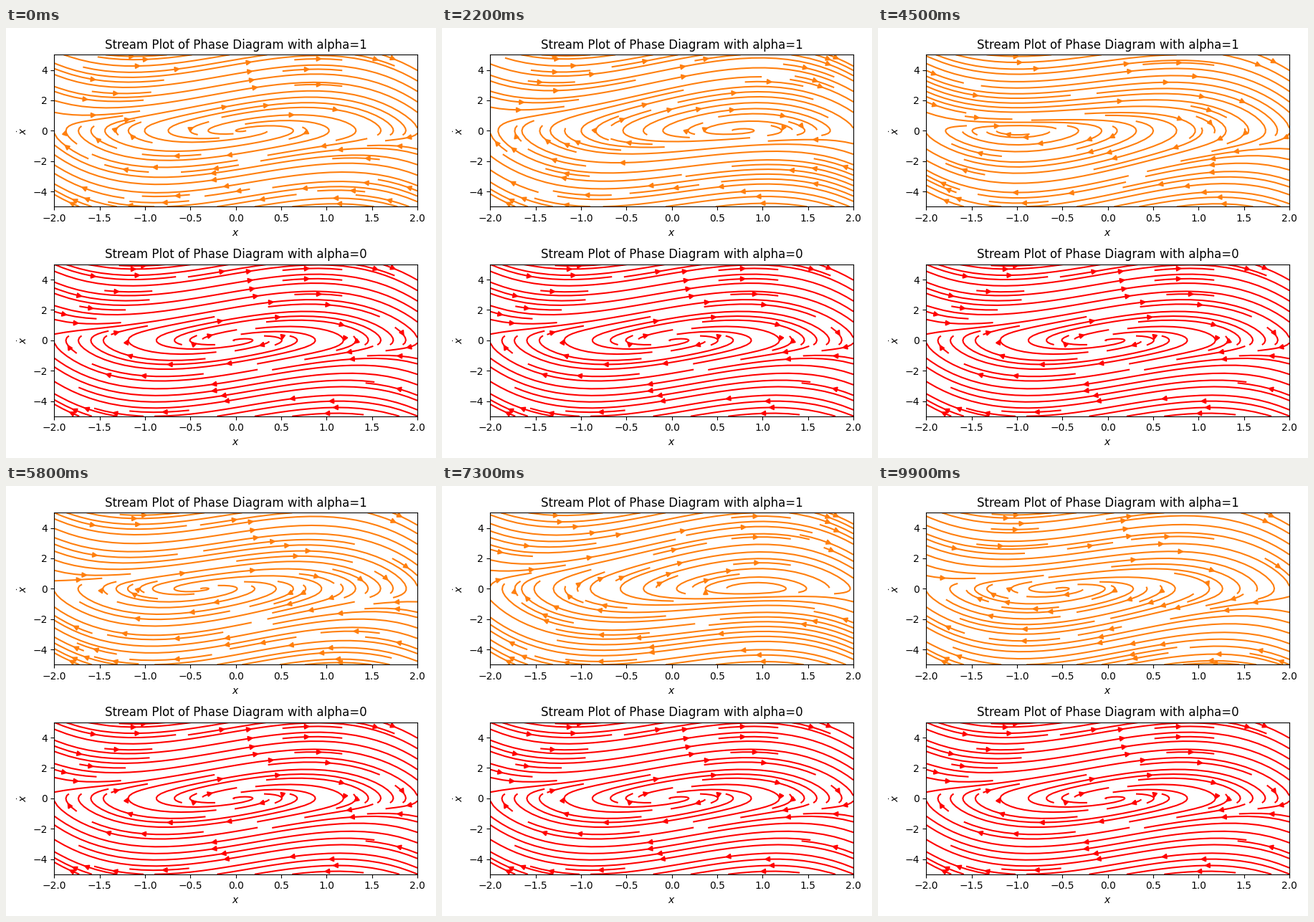
These frames come from a looping animation (600x600 px, 10000 ms). A matplotlib script:

```python
from math import hypot, sin, sqrt

import matplotlib.pyplot as plt
import numpy as np
from matplotlib.animation import FuncAnimation
from matplotlib.collections import LineCollection, PolyCollection
from matplotlib.transforms import IdentityTransform

FRAMES = 100
TIME_STEP = 0.1
MU = 1.0

LAST = 29               # index of the last cell of the 30 x 30 spacing mask
MAX_STEP = 1 / 30
MAX_ERR = 0.003
MAX_LEN, MIN_LEN = 2, 0.1

PT = 100 / 72           # pixels per point
LW = 1.5
HEAD_LEN, HEAD_HALF = 4 * PT, 2 * PT
HEAD_PAD = 0.5 * LW * PT * hypot(HEAD_LEN, HEAD_HALF) / HEAD_HALF
SHRINK = 2 * PT
SPAN = np.array([4, 10])  # data range of the axes


def spiral(last):
    """Mask cells from the border inwards, anticlockwise."""
    for lo in range((last + 1) // 2):
        hi = last - lo
        yield from ((i, lo) for i in range(lo, hi + 1))
        yield from ((hi, j) for j in range(lo + 1, hi + 1))
        yield from ((i, hi) for i in range(hi - 1, lo - 1, -1))
        yield from ((lo, j) for j in range(hi - 1, lo, -1))


SEEDS = list(spiral(LAST))


def inside(p, q):
    return 0 <= p <= 1 and 0 <= q <= 1


def to_edge(pos, vel):
    if vel == 0:
        return float("inf")
    return (1 - pos) / vel if vel > 0 else -pos / vel


def streamlines(force):
    """Evenly spaced streamlines of a driven Van der Pol oscillator,
    in axes coordinates."""
    taken, trail, cell = set(), [], None

    def heading(p, q, sign):
        x, y = 4 * p - 2, 10 * q - 5
        u = y / 4
        w = (MU * (1 - x * x) * y - x + force) / 10
        speed = sign * (hypot(u, w) or 1e-12)
        return u / speed, w / speed

    def enter(p, q):
        nonlocal cell
        new = round(p * LAST), round(q * LAST)
        if new != cell:
            if new in taken:
                return False
            taken.add(new)
            trail.append(new)
            cell = new
        return True

    def trace(p, q, sign):
        pts, ds, total = [(p, q)], MAX_STEP, 0
        while True:
            a, b = heading(p, q, sign)
            p2, q2 = p + ds * a, q + ds * b
            if not inside(p2, q2):
                reach = min(to_edge(p, a), to_edge(q, b))
                pts.append((p + a * reach, q + b * reach))
                return total + reach, pts
            c, d = heading(p2, q2, sign)
            err = ds / 2 * hypot(c - a, d - b)
            if err < MAX_ERR:
                p += ds * (a + c) / 2
                q += ds * (b + d) / 2
                if (not inside(p, q) or not enter(p, q)
                        or total + ds > MAX_LEN):
                    return total, pts
                total += ds
                pts.append((p, q))
            ds = min(MAX_STEP, 0.85 * ds * sqrt(MAX_ERR / err)) if err else MAX_STEP

    lines = []
    for seed in SEEDS:
        if seed in taken:
            continue
        p, q = seed[0] / LAST, seed[1] / LAST
        trail.clear()
        enter(p, q)
        back_len, back = trace(p, q, -1)
        cell = seed
        fore_len, fore = trace(p, q, 1)
        if back_len + fore_len > MIN_LEN:
            lines.append(np.array(back[::-1] + fore[1:]))
        else:
            taken.difference_update(trail)
    return lines


def arrow_head(line, size):
    """Triangle in pixels, relative to the axes corner, halfway along a line."""
    steps = np.diff(line * SPAN, axis=0)
    dist = np.cumsum(np.hypot(steps[:, 0], steps[:, 1]))
    n = np.searchsorted(dist, dist[-1] / 2)
    tail, tip = line[n] * size, (line[n] + line[n + 1]) / 2 * size
    length = hypot(*(tip - tail)) or 1
    along = (tip - tail) / length
    side = np.array([-along[1], along[0]]) * HEAD_HALF
    tip = tip - along * (HEAD_PAD + (SHRINK if length > 2 * SHRINK else 0))
    base = tip - along * HEAD_LEN
    return [base + side, tip, base - side]


class StreamPanel:
    def __init__(self, ax, color):
        self.box = ax.bbox
        self.lines = LineCollection([], colors=color, linewidths=LW,
                                    transform=ax.transAxes, zorder=2)
        self.heads = PolyCollection([], facecolors=color, edgecolors=color,
                                    linewidths=LW, joinstyle="round",
                                    transform=IdentityTransform(), zorder=2)
        for c in (self.lines, self.heads):
            ax.add_collection(c, autolim=False)

    def show(self, force):
        lines = streamlines(force)
        size = np.array([self.box.width, self.box.height])
        corner = np.array([self.box.x0, self.box.y0])
        self.lines.set_segments(lines)
        self.heads.set_verts([arrow_head(ln, size) + corner for ln in lines])


def style(ax, alpha):
    ax.set(xlim=(-2, 2), ylim=(-5, 5), xlabel="$x$", ylabel=r"$\dot{x}$",
           title=f"Stream Plot of Phase Diagram with alpha={alpha}")


fig, (top, bottom) = plt.subplots(2, 1, figsize=(6, 6), dpi=100)
style(top, 1)
style(bottom, 0)
fig.tight_layout()

driven = StreamPanel(top, "tab:orange")
StreamPanel(bottom, "red").show(0)


def update(i):
    driven.show(sin(TIME_STEP * (i + 1)))


anim = FuncAnimation(fig, update, frames=FRAMES, interval=100,
                     repeat=True, repeat_delay=0)
plt.show()
```
